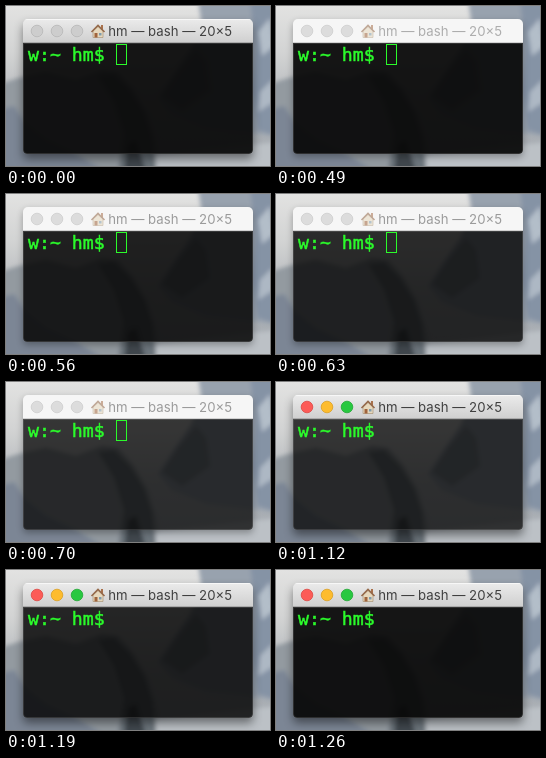
These frames come from a looping animation (264 by 160 pixels, 1.68 s). An HTML page:

```html
<!DOCTYPE html>
<html lang="en">
<head>
<meta charset="utf-8">
<title>Terminal window focus</title>
<style>
  html, body { margin: 0; width: 100%; height: 100%; overflow: hidden; }
  body { position: relative; background: #b5bbc2; }
  svg { position: absolute; left: 0; top: 0; }
  #win {
    position: absolute; left: 17px; top: 13px; width: 230px; height: 135px;
    border-radius: 5px 5px 4px 4px; overflow: hidden;
    box-shadow: 0 3px 7px rgba(0,0,0,.3);
  }
  #win.active { box-shadow: 0 5px 10px rgba(0,0,0,.45); }
  #bar { height: 23px; background: #f6f6f6; border-bottom: 1px solid #d2d2d2; }
  .active #bar {
    background: linear-gradient(#ebebeb, #d0d0d0);
    border-color: #aaa; box-shadow: inset 0 1px #f7f7f7;
  }
  #body { height: 111px; border-radius: 0 0 4px 4px; box-shadow: inset 0 0 0 1px rgba(255,255,255,.13); }
  .title { font: 13.2px Inter, Roboto, sans-serif; }
  .prompt {
    font: 18.2px "DejaVu Sans Mono", "Noto Sans Mono", monospace;
    fill: #2bfb2b; stroke: #2bfb2b; stroke-width: .5; white-space: pre;
  }
</style>
</head>
<body>
<svg width="264" height="160" viewBox="0 0 264 160">
  <defs>
    <linearGradient id="sky" x2="0" y2="1">
      <stop offset="0" stop-color="#e2e2e1"/>
      <stop offset=".3" stop-color="#d2d3d3"/>
      <stop offset=".65" stop-color="#b0b4b8"/>
      <stop offset="1" stop-color="#a2a8af"/>
    </linearGradient>
    <filter id="soft" x="-20%" y="-20%" width="140%" height="140%"><feGaussianBlur stdDeviation="2"/></filter>
  </defs>
  <rect width="264" height="160" fill="url(#sky)"/>
  <!-- misty mountains -->
  <g filter="url(#soft)">
    <path d="M192-6 196 20 184 44 166 70 152 92 166 108 200 122 270 130V-6Z" fill="#98a2ae"/>
    <path d="M190 44 172 66 156 90 176 104 204 84 200 56Z" fill="#7f8992"/>
    <path d="M270-6H244L250 40 246 84 252 124 270 130Z" fill="#8593a5"/>
    <path d="M264 12 252 26 256 50 268 40Z" fill="#b3bec9"/>
    <path d="M266 74 254 86 252 106 268 96Z" fill="#adb8c4"/>
    <path d="M-6 78 12 72 40 66 70 74 96 64 112 66 128 84 142 108 150 134 156 166H-6Z" fill="#939aa0"/>
    <path d="M92 70 108 68 124 84 138 106 146 130 150 166H112L118 128 108 96Z" fill="#6c747b"/>
    <path d="M118 166 122 138 130 134 140 166Z" fill="#3f464d"/>
    <path d="M-6 104 8 100 20 118 40 134 70 148 100 166H-6Z" fill="#7b8695"/>
    <path d="M150 150 200 144 270 136V166H150Z" fill="#bcc1c6"/>
  </g>
</svg>
<div id="win"><div id="bar"></div><div id="body"></div></div>
<svg width="264" height="160" viewBox="0 0 264 160">
  <g id="lights" stroke-width=".8">
    <circle cx="31" cy="25" r="5.8"/>
    <circle cx="51" cy="25" r="5.8"/>
    <circle cx="71" cy="25" r="5.8"/>
  </g>
  <g id="house">
    <path d="M95 19h2v5h-2Z" fill="#a9714c"/>
    <path d="M87 25 92 20.5 97 25V31.5H87Z" fill="#e6d8bd" stroke="#a18b6c" stroke-width=".6"/>
    <path d="M85.5 26 92 19.5 98.5 26" fill="none" stroke="#94694a" stroke-width="1.6"/>
    <path d="M88.5 27h3v4.5h-3Z" fill="#a0643c"/>
    <path d="M93 27h2.5v2.5H93Z" fill="#7f9cad"/>
  </g>
  <text id="title" class="title" x="226" y="30" text-anchor="end">hm — bash — 20×5</text>
  <text class="prompt" x="22" y="55">w:~ hm$</text>
  <rect id="cursor" x="110.5" y="38.5" width="10" height="20" fill="none" stroke="#2bfb2b"/>
</svg>
<script>
const LOOP = 1680, STEP = 70, BLUR = 490, FOCUS = 1120;
const SOLID = .935, CLEAR = .775;
const $ = id => document.getElementById(id);
const ramp = (t, from, to) => Math.min(1, Math.max(0, (t - from) / (to - from)));
const lights = [...$("lights").children];
const colors = [["#fc5b57", "#dd4743"], ["#fdbc2e", "#dca023"], ["#28c840", "#21a834"]];

function draw(now) {
  const t = Math.floor((now % LOOP) / STEP) * STEP;
  const active = t < BLUR || t >= FOCUS;
  const lit = t >= FOCUS;
  const clear = ramp(t, BLUR, 700) - ramp(t, FOCUS, 1260);

  $("win").className = active ? "active" : "";
  $("body").style.background = `rgba(8,8,8,${SOLID + (CLEAR - SOLID) * clear})`;
  $("title").setAttribute("fill", active ? "#404040" : t === BLUR ? "#adadad" : "#9b9b9b");
  $("house").setAttribute("opacity", active ? 1 : .55);
  $("cursor").setAttribute("visibility", lit ? "hidden" : "visible");
  lights.forEach((c, i) => {
    const [fill, stroke] = lit ? colors[i] : active ? ["#cdcdcd", "#b7b7b7"] : ["#dcdcdc", "#cecece"];
    c.setAttribute("fill", fill);
    c.setAttribute("stroke", stroke);
  });
}

const start = performance.now();
function tick() {
  draw(performance.now() - start);
  requestAnimationFrame(tick);
}
tick();
</script>
</body>
</html>
```
